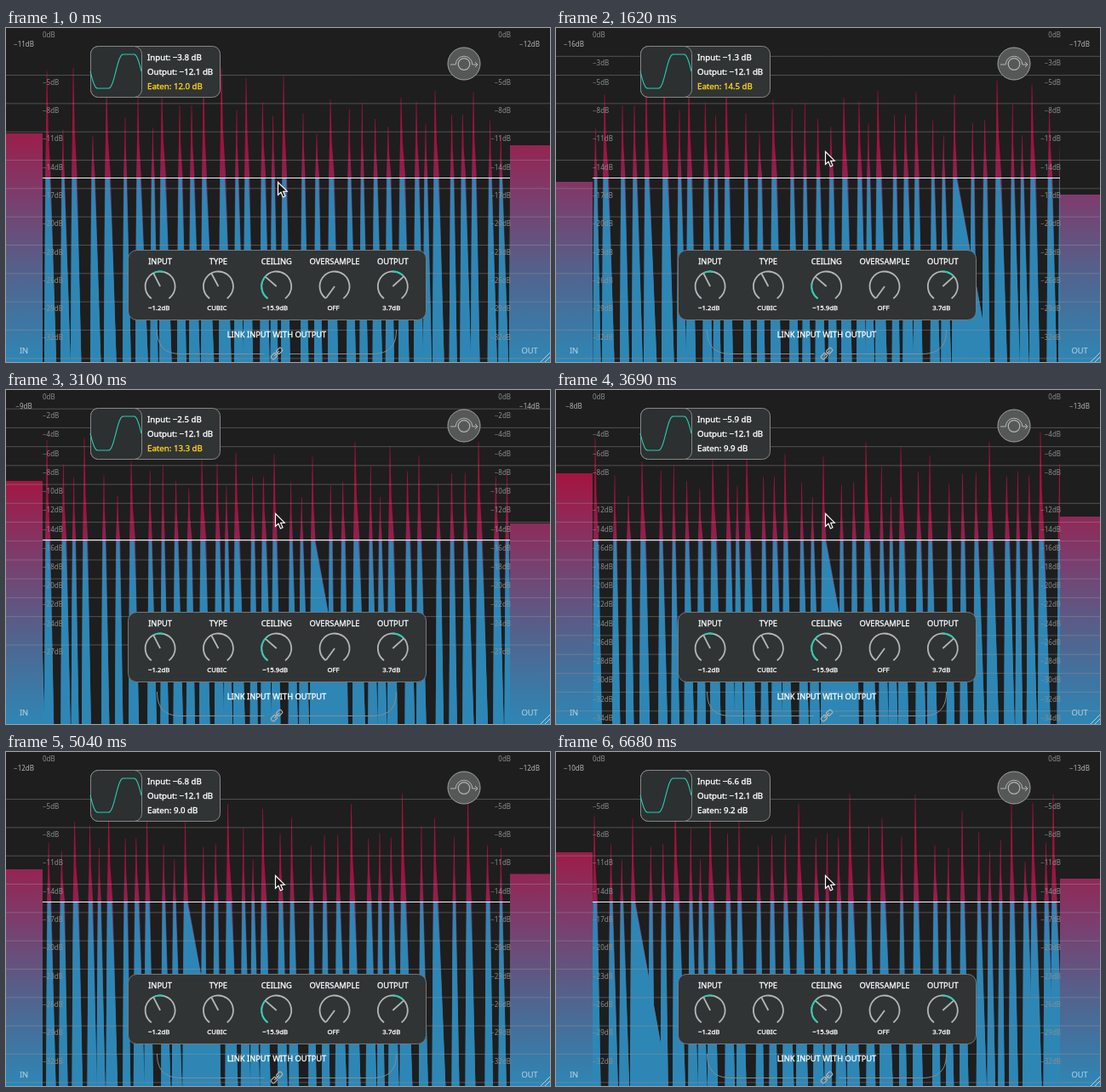
An HTML page with a canvas that plays this animation: 639 by 393 pixels, repeating every 6.83 s.

```html
<!DOCTYPE html>
<html lang="en">
<head>
<meta charset="utf-8">
<title>Clipper</title>
<style>
  html, body { margin: 0; width: 100%; height: 100%; overflow: hidden; background: #1e1e1e; }
  canvas { display: block; width: 639px; height: 393px; }
</style>
</head>
<body>
<canvas id="stage"></canvas>
<script>
const W = 639, H = 393, LOOP = 6830, DB = 11.11, CEIL = 176.5, LEFT = 43, RIGHT = 592;
const TEAL = '#27cdb4', BLUE = '#2e86b5', GREY = '#b4b6b6';
const canvas = document.getElementById('stage');
const ratio = window.devicePixelRatio || 1;
canvas.width = W * ratio;
canvas.height = H * ratio;
const c = canvas.getContext('2d');
c.scale(ratio, ratio);

function gradient(...stops) {
  const g = c.createLinearGradient(0, 0, 0, H);
  stops.forEach(([p, color]) => g.addColorStop(p, color));
  return g;
}
const meterFill = gradient([0, '#c20b37'], [0.25, '#a5143f'], [0.5, '#7d3c6c'], [0.75, '#50658f'], [1, BLUE]);
const spikeFill = gradient([0, '#bd0b36'], [0.35, '#a3103e'], [0.48, '#862a58'], [0.62, '#5f5487'], [0.8, BLUE]);

const lerp = (a, b, p) => a + (b - a) * p;
const rad = deg => (deg - 90) * Math.PI / 180;
const hash = n => Math.abs(Math.sin(n * 12.9898) * 43758.5453) % 1;

// Accented hits on the scrolling track; weaker hits are spread between them
const accents = [48, 79, 118, 155, 183, 232, 253, 282, 326, 381, 464, 504, 549,
  594, 644, 685, 719, 789, 849, 887, 926, 981, 1039, 1064, 1088];
const SWELL = 594;

function makeHit(x, accent) {
  const vary = hash(x), wide = accent ? 1.5 : 0;
  const w = 1.8 + hash(x + 0.5) * 2.2 + wide;
  return {
    x, w,
    top: accent ? 45 + vary * 40 : 85 + vary * 45,
    tail: x === SWELL ? 42 : w + 2 + hash(x + 0.7) * 5 + wide
  };
}

const hits = accents.flatMap((x, i) => {
  const gap = (accents[i + 1] || x) - x;
  const count = Math.round(gap / 16);
  const bar = [makeHit(x, true)];
  for (let k = 1; k < count; k++) {
    const p = k / count;
    bar.push(makeHit(x + gap * p + 7 * (1 - p), false)); // late after an accent
  }
  return bar;
});

// Key points as [step, value]
const scrollKeys = [[0, 0], [11, 126], [21, 234], [39, 441], [45, 504]];
const inputKeys = [[0, 124], [6, 146], [11, 181], [21, 107], [29, 89], [39, 187], [45, 118]];
const outputKeys = [[0, 138], [6, 151], [11, 196], [21, 157], [29, 141], [45, 149]];
const mouseX = [[0, 319], [6, 303], [11, 316]];
const mouseY = [[0, 181], [6, 167], [11, 145]];

function tween(keys, step) {
  const next = keys.findIndex(([s]) => s > step);
  if (next < 0) return keys[keys.length - 1][1];
  const [s0, v0] = keys[next - 1], [s1, v1] = keys[next];
  return lerp(v0, v1, (step - s0) / (s1 - s0));
}

function range(from, to, by) {
  const out = [];
  for (let v = from; v <= to; v += by) out.push(v);
  return out;
}

// Held input peak and the scale that goes with it
const thirds = range(5, 35, 3);
const states = [
  { from: 0, input: -3.8, grid: thirds },
  { from: 3, input: -1.3, grid: [3, ...thirds] },
  { from: 16, input: -2.5, grid: [...range(2, 24, 2), 27] },
  { from: 25, input: -5.9, grid: [4, 6, 8, ...range(12, 34, 2)] },
  { from: 34, input: -6.8, grid: thirds },
  { from: 42, input: -6.6, grid: thirds }
];

function stepAt(ms) {
  return ms < 3682 ? Math.floor((ms + 8) / 147.6) : Math.min(45, 25 + Math.floor((ms - 3682) / 149.5));
}

function text(str, x, y, size, { color = '#fff', align = 'left', bold = 0 } = {}) {
  str = str.replace('-', '\u2212');
  c.font = `${size}px "Noto Sans", "Open Sans", sans-serif`;
  c.textAlign = align;
  c.fillStyle = c.strokeStyle = color;
  c.fillText(str, x, y);
  if (!bold) return;
  c.lineWidth = bold;
  c.strokeText(str, x, y);
}

function stroke(color, width, draw) {
  c.beginPath();
  draw();
  c.strokeStyle = color;
  c.lineWidth = width;
  c.stroke();
}

function segment(x1, y1, x2, y2, color, width = 1) {
  stroke(color, width, () => { c.moveTo(x1, y1); c.lineTo(x2, y2); });
}

function polygon(points, fill) {
  c.beginPath();
  points.forEach(([x, y]) => c.lineTo(x, y));
  c.closePath();
  c.fillStyle = fill;
  c.fill();
}

function box(x, y, w, h, r, fill, edge) {
  c.beginPath();
  c.roundRect(x + 0.5, y + 0.5, w, h, r);
  c.fillStyle = fill;
  c.fill();
  c.strokeStyle = edge;
  c.lineWidth = 1;
  c.stroke();
}

function drawWave(scroll) {
  c.save();
  c.beginPath();
  c.rect(LEFT, 0, RIGHT - LEFT, H);
  c.clip();
  for (const hit of hits) {
    const x = hit.x - scroll, { w, tail, top } = hit;
    const mid = lerp(top, CEIL, 0.55), low = 235;
    const lowW = lerp(w, tail, (low - CEIL) / (H - CEIL));
    polygon([[x - 3, H], [x - 2, CEIL], [x - 1, mid], [x - 0.3, top], [x + 0.3, top],
      [x + w * 0.35, mid], [x + w, CEIL], [x + tail, H]], spikeFill);
    polygon([[x - 3, H], [x - 2.1, low], [x - 1.4, CEIL], [x + w * 0.75, CEIL],
      [x + lowW - 0.5, low], [x + tail, H]], BLUE);
  }
  c.restore();
}

function drawMeter(x, w, top, labelX, name) {
  c.fillStyle = meterFill;
  c.fillRect(x, top, w, H - top);
  text(`-${Math.floor(top / DB)}dB`, labelX, 22, 8, { color: '#b5b5b5', align: 'center' });
  text(name, labelX, 383, 9.3, { color: '#a9c9dc', align: 'center', bold: 0.2 });
}

function drawGrid(levels) {
  for (const db of levels) segment(0, db * DB, W, db * DB, 'rgba(150,150,150,0.42)');
  for (const db of [0, ...levels]) {
    const y = db * DB + 11, label = db ? `-${db}dB` : '0dB';
    text(label, LEFT, y, 8, { color: '#8b8d8e' });
    text(label, 593, y, 8, { color: '#8b8d8e', align: 'right' });
  }
  segment(LEFT, CEIL, RIGHT, CEIL, '#f4f4f4');
}

function drawInfo(input) {
  box(99, 21, 152, 60, 9, '#303435', '#858888');
  box(99, 21, 60, 60, 9, '#2c3031', '#858888');
  // Sine through a cubic soft clipper
  stroke(TEAL, 1.1, () => {
    for (let x = 0; x <= 60; x++) {
      const u = Math.max(-1, Math.min(1, 1.25 * Math.sin(x * Math.PI / 30)));
      c.lineTo(99 + x, 51 + 20 * (1.5 * u - 0.5 * u ** 3));
    }
  });
  const eaten = input + 15.8, bold = 0.35;
  text(`Input: ${input.toFixed(1)} dB`, 166, 38, 9.7, { bold });
  text('Output: -12.1 dB', 166, 55, 9.7, { bold });
  text(`Eaten: ${eaten.toFixed(1)} dB`, 166, 72, 9.7, { bold, color: eaten > 10 ? '#ffd21c' : '#fff' });
}

function drawBypass() {
  box(518.5, 22.5, 38, 38, 19, '#565858', '#a2a4a4');
  stroke(GREY, 1.2, () => c.arc(538, 42.5, 6.8, 0, 7));
  stroke(GREY, 1, () => {
    c.moveTo(522, 43);
    c.lineTo(528, 43);
    c.arc(538, 43, 9.8, Math.PI, 0);
    c.lineTo(554, 43);
    c.moveTo(551, 40);
    c.lineTo(554, 43);
    c.lineTo(551, 46);
  });
}

function drawPanel(level) {
  box(143, 261, 350, 82, 10, '#303435', '#777a7b');
  const knobs = [
    { name: 'INPUT', value: '-1.2dB', angle: -27, lit: [-27, 14] },
    { name: 'TYPE', value: 'CUBIC', angle: -28 },
    { name: 'CEILING', value: '-15.9dB', angle: -49, lit: [-144, -45 - (level - 130) * 0.6] },
    { name: 'OVERSAMPLE', value: 'OFF', angle: -144 },
    { name: 'OUTPUT', value: '3.7dB', angle: 48, lit: [0, 48] }
  ];
  knobs.forEach(({ name, value, angle, lit }, i) => {
    const x = 181.1 + 68.3 * i, y = 304, r = 17.5, a = rad(angle);
    text(name, x, 278, 9.3, { align: 'center', bold: 0.3 });
    stroke(GREY, 1.8, () => c.arc(x, y, r, rad(-144), rad(144)));
    if (lit) stroke(TEAL, 1.8, () => c.arc(x, y, r, rad(lit[0]), rad(lit[1])));
    segment(x, y, x + Math.cos(a) * 17, y + Math.sin(a) * 17, GREY, 1.8);
    text(value, x - 1.5, 332, 7.8, { align: 'center', bold: 0.3 });
  });
}

function drawLink() {
  text('LINK INPUT WITH OUTPUT', 318, 364, 9.3, { align: 'center', bold: 0.3 });
  for (const side of [-1, 1]) {
    const at = d => 318 + side * d;
    stroke('#858d92', 1, () => {
      c.moveTo(at(140.5), 355);
      c.bezierCurveTo(at(140.5), 373, at(133), 383.5, at(112), 383.5);
      c.lineTo(at(14.5), 383.5);
    });
  }
  c.save();
  c.translate(318, 383);
  c.rotate(-Math.PI / 4);
  for (const x of [-8, 1]) stroke('#b5b0ac', 1.2, () => c.roundRect(x, -2.5, 7, 5, 1.5));
  segment(-4, 0, 4, 0, '#b5b0ac', 1.2);
  c.restore();
}

function drawCursor(x, y) {
  c.save();
  c.translate(x, y);
  polygon([[0.5, 0.5], [0.5, 15.5], [4, 12.3], [6.4, 18], [9, 16.8], [6.6, 11.4], [11.2, 11.2]], '#151515');
  c.strokeStyle = '#fff';
  c.lineWidth = 1.2;
  c.stroke();
  c.restore();
}

function draw(ms) {
  const step = stepAt(ms);
  const state = states.filter(s => s.from <= step).pop();
  const level = tween(inputKeys, step);
  c.fillStyle = '#1e1e1e';
  c.fillRect(0, 0, W, H);
  drawWave(tween(scrollKeys, step));
  drawMeter(0, LEFT, level, 21, 'IN');
  drawMeter(RIGHT, W - RIGHT, tween(outputKeys, step), 615, 'OUT');
  drawGrid(state.grid);
  drawInfo(state.input);
  drawBypass();
  drawPanel(level);
  drawLink();
  segment(628, H, W, 382, '#c3ccd2');
  segment(633, H, W, 387, '#c3ccd2');
  drawCursor(tween(mouseX, step), tween(mouseY, step));
}

const start = performance.now();
function tick() {
  draw((performance.now() - start) % LOOP);
  requestAnimationFrame(tick);
}
tick();
</script>
</body>
</html>
```
